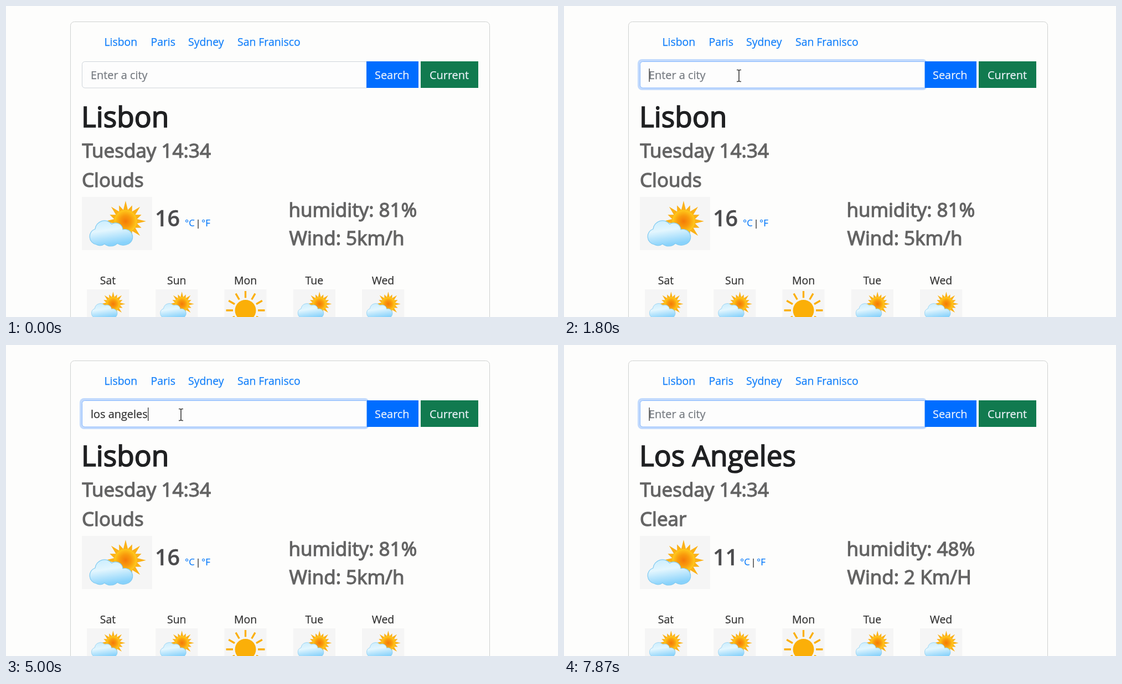
Recreate the animation shown at these times as an HTML page. Size 997 px wide and 562 px high, loop 8000 ms.

```html
<!DOCTYPE html>
<html lang="en">
<head>
<meta charset="utf-8">
<title>Weather search</title>
<style>
  html, body { margin: 0; width: 100%; height: 100%; overflow: hidden; background: #fdfdfc; }
  svg { display: block; width: 997px; height: 562px; }
  text {
    font: 19.4px "Open Sans", "Noto Sans", sans-serif; white-space: pre;
    color: #333; fill: currentColor; stroke: currentColor; stroke-width: .25px;
  }
  .link { color: #127ffa; }
  .button { font-size: 19.9px; color: #eef4fb; }
  .day { text-anchor: middle; }
  .city { font-size: 51.4px; color: #1f2022; stroke-width: 1.7px; }
  .detail { font-size: 35px; color: #646464; stroke-width: 1.3px; }
  .degrees { font-size: 39.5px; font-weight: 600; color: #4b4b4d; stroke-width: .3px; }
  .unit { font-size: 16.7px; }
  .field { font-size: 19.9px; }
  .placeholder { color: #757a80; }
  .selected { color: #fff; fill: currentColor; stroke: currentColor; }
</style>
</head>
<body>
<svg id="stage" viewBox="0 0 997 562">
  <defs>
    <radialGradient id="sunFill">
      <stop offset="0" stop-color="#f47a08"/>
      <stop offset=".5" stop-color="#f99a0c"/>
      <stop offset="1" stop-color="#ffca1c"/>
    </radialGradient>
    <linearGradient id="cloudFill" x1="0" y1="0" x2=".25" y2="1">
      <stop offset="0" stop-color="#c8ecfd"/>
      <stop offset=".45" stop-color="#e3f6fe"/>
      <stop offset="1" stop-color="#88d2fb"/>
    </linearGradient>
    <g id="cloudy">
      <rect width="127" height="96" fill="#f5f5f5"/>
      <path id="spikes" fill="#fbb117"/>
      <circle cx="79" cy="44" r="20.5" fill="url(#sunFill)"/>
      <path transform="translate(-137 -345)" fill="url(#cloudFill)" stroke="#82cbf2" stroke-width="1.2"
        d="M163 431A14.500 14.500 0 0 1 161 403A17 17 0 0 1 191 394A13 13 0 0 1 211 404A14 14 0 0 1 221 430A20 20 0 0 1 201 429A17 17 0 0 1 178 430A14 14 0 0 1 163 431Z"/>
    </g>
    <g id="sunny">
      <rect width="76" height="58" fill="#f5f5f5"/>
      <circle cx="38" cy="38" r="19" fill="#fbaf08"/>
      <path id="rays" stroke="#fbaf08" stroke-width="3.3"/>
    </g>
    <path id="beamShape" d="M-4-10.500H-1.500L0-9.500L1.500-10.500H4M0-9.500V9.500M-4 10.500H-1.500L0 9.500L1.500 10.500H4"/>
  </defs>

  <rect width="997" height="562" fill="#fdfdfc"/>
  <rect x="116.5" y="28.5" width="757" height="600" rx="7" fill="none" stroke="#cfd1d0"/>

  <rect id="glow" x="133" y="96" width="523" height="56" rx="8" fill="#c2dafd"/>
  <path id="box" d="M651.5 100.5H142.5a5 5 0 0 0-5 5V143a5 5 0 0 0 5 5H651.5Z" fill="#fdfdfd"/>
  <path id="search" fill="#006dff"/>
  <path d="M749 100H853V148H749Z" fill="#117a4f"/>

  <g id="labels"></g>
  <g id="units"></g>
  <rect id="highlight" y="113" height="24" fill="#f3602b"/>
  <text id="field" class="field" x="153" y="131.5"><tspan id="plain"></tspan><tspan id="marked" class="selected"></tspan></text>
  <rect id="caret" y="113" width="1.2" height="24" fill="#222"/>

  <path id="arrow" d="M0 0V20.500L4.800 16.200L8 23.500L11.500 22L8.300 14.800H14Z" fill="#2b2b2b" stroke="#fff" stroke-width="1.3"/>
  <g id="beam" fill="none">
    <use href="#beamShape" stroke="#fff" stroke-width="4"/>
    <use href="#beamShape" stroke="#444" stroke-width="1.7"/>
  </g>
</svg>

<script>
const LOOP = 8000;
const QUERY = 'los angeles';
const FOCUS = 1800, RESULT = 5130, DRAG = 5330, DRAG_END = 5600, CLEAR = 7670;
const KEY_TIMES = [2670, 2870, 3130, 3400, 3600, 3800, 4000, 4200, 4470, 4670, 4870];
const CARET_OFF = [2200, 2670];
// time, x, y of the pointer
const POINTER = [
  [70, 470, 575], [600, 428, 375], [1070, 376, 183], [1600, 316, 126],
  [DRAG, 316, 126], [DRAG_END, -12, 128]
];

const $ = id => document.getElementById(id);
const show = (el, on) => el.setAttribute('visibility', on ? 'visible' : 'hidden');
const setText = (el, value) => { if (el.textContent !== value) el.textContent = value; };

function add(parent, tag, attrs, content = '') {
  const el = document.createElementNS('http://www.w3.org/2000/svg', tag);
  for (const key in attrs) el.setAttribute(key, attrs[key]);
  el.textContent = content;
  return parent.appendChild(el);
}
const label = (content, x, y, cls, parent = $('labels')) =>
  add(parent, 'text', { x, y, class: cls }, content);

function polar(cx, cy, r, turn) {
  const a = turn * 2 * Math.PI - Math.PI / 2;
  return `${(cx + r * Math.cos(a)).toFixed(2)} ${(cy + r * Math.sin(a)).toFixed(2)}`;
}

$('spikes').setAttribute('d', 'M' + Array.from({ length: 32 }, (_, i) =>
  polar(79, 44, i % 2 ? 21 : i % 4 ? 31 : 37, i / 32)).join('L') + 'Z');
$('rays').setAttribute('d', Array.from({ length: 12 }, (_, i) =>
  `M${polar(38, 38, 22.5, i / 12)}L${polar(38, 38, 35, i / 12)}`).join(''));

[['Lisbon', 177.5], ['Paris', 261.5], ['Sydney', 329], ['San Franisco', 418]]
  .forEach(([name, x]) => label(name, x, 72, 'link'));
label('Search', 666, 131.5, 'button');
label('Current', 765, 131.5, 'button');
label('Tuesday 14:34', 137.5, 274, 'detail');
const city = label('', 136, 219, 'city');
const sky = label('', 137, 327, 'detail');
const degrees = label('', 269, 398, 'degrees');
const humidity = label('', 510.5, 381, 'detail');
const wind = label('', 511.5, 432, 'detail');
label('°C', 323, 398, 'unit link', $('units'));
label('|', 342.5, 398, 'unit', $('units'));
label('°F', 353, 398, 'unit link', $('units'));

add($('labels'), 'use', { href: '#cloudy', x: 137, y: 345 });
['Sat', 'Sun', 'Mon', 'Tue', 'Wed'].forEach((day, i) => {
  const x = 146 + i * 124.25;
  label(day, x + 38, 503, 'day');
  const sunny = day === 'Mon';
  add($('labels'), 'use', {
    href: sunny ? '#sunny' : '#cloudy',
    transform: `translate(${x} 512) scale(${sunny ? 1 : 0.6})`
  });
});

function pointerAt(t) {
  const next = POINTER.findIndex(p => p[0] > t);
  if (next < 1) return null;
  const [t0, x0, y0] = POINTER[next - 1], [t1, x1, y1] = POINTER[next];
  const k = (t - t0) / (t1 - t0);
  return [x0 + (x1 - x0) * k, y0 + (y1 - y0) * k];
}

function drawWeather(found) {
  setText(city, found ? 'Los Angeles' : 'Lisbon');
  setText(sky, found ? 'Clear' : 'Clouds');
  setText(degrees, found ? '11' : '16');
  setText(humidity, `humidity: ${found ? 48 : 81}%`);
  setText(wind, found ? 'Wind: 2 Km/H' : 'Wind: 5km/h');
  $('units').setAttribute('transform', `translate(${found ? -5 : 0} 0)`);
}

function drawField(t, pointer) {
  const focused = t >= FOCUS;
  const typed = t < CLEAR ? QUERY.slice(0, KEY_TIMES.filter(k => k <= t).length) : '';
  show($('glow'), focused);
  $('box').setAttribute('stroke', focused ? '#86b7fe' : '#ced4da');
  $('search').setAttribute('d', `M${focused ? 652 : 651} 100H745V148H${focused ? 652 : 651}Z`);
  $('field').classList.toggle('placeholder', !typed);

  let split = typed.length;
  if (typed && t >= DRAG) {
    const reach = pointer ? (pointer[0] - 153) / 103 : 0;
    split = Math.round(Math.min(1, Math.max(0, reach)) * typed.length);
  }
  setText($('plain'), typed ? typed.slice(0, split) : 'Enter a city');
  setText($('marked'), typed.slice(split));

  const start = 153 + (typed ? $('plain').getComputedTextLength() : 0);
  const width = split < typed.length ? $('marked').getComputedTextLength() : 0;
  $('highlight').setAttribute('x', start);
  $('highlight').setAttribute('width', width);
  $('caret').setAttribute('x', start + 0.5);
  show($('caret'), focused && !width && !(t >= CARET_OFF[0] && t < CARET_OFF[1]));
}

function drawPointer(pointer, dragging) {
  const [x, y] = pointer || [0, 0];
  const overField = dragging || (x > 137 && x < 651 && y > 100 && y < 148);
  show($('arrow'), pointer && !overField);
  show($('beam'), pointer && overField);
  for (const id of ['arrow', 'beam']) $(id).setAttribute('transform', `translate(${x} ${y})`);
}

function frame() {
  const t = performance.now() % LOOP;
  const pointer = pointerAt(t);
  drawWeather(t >= RESULT);
  drawField(t, pointer);
  drawPointer(pointer, t >= DRAG);
  requestAnimationFrame(frame);
}
frame();
</script>
</body>
</html>
```
